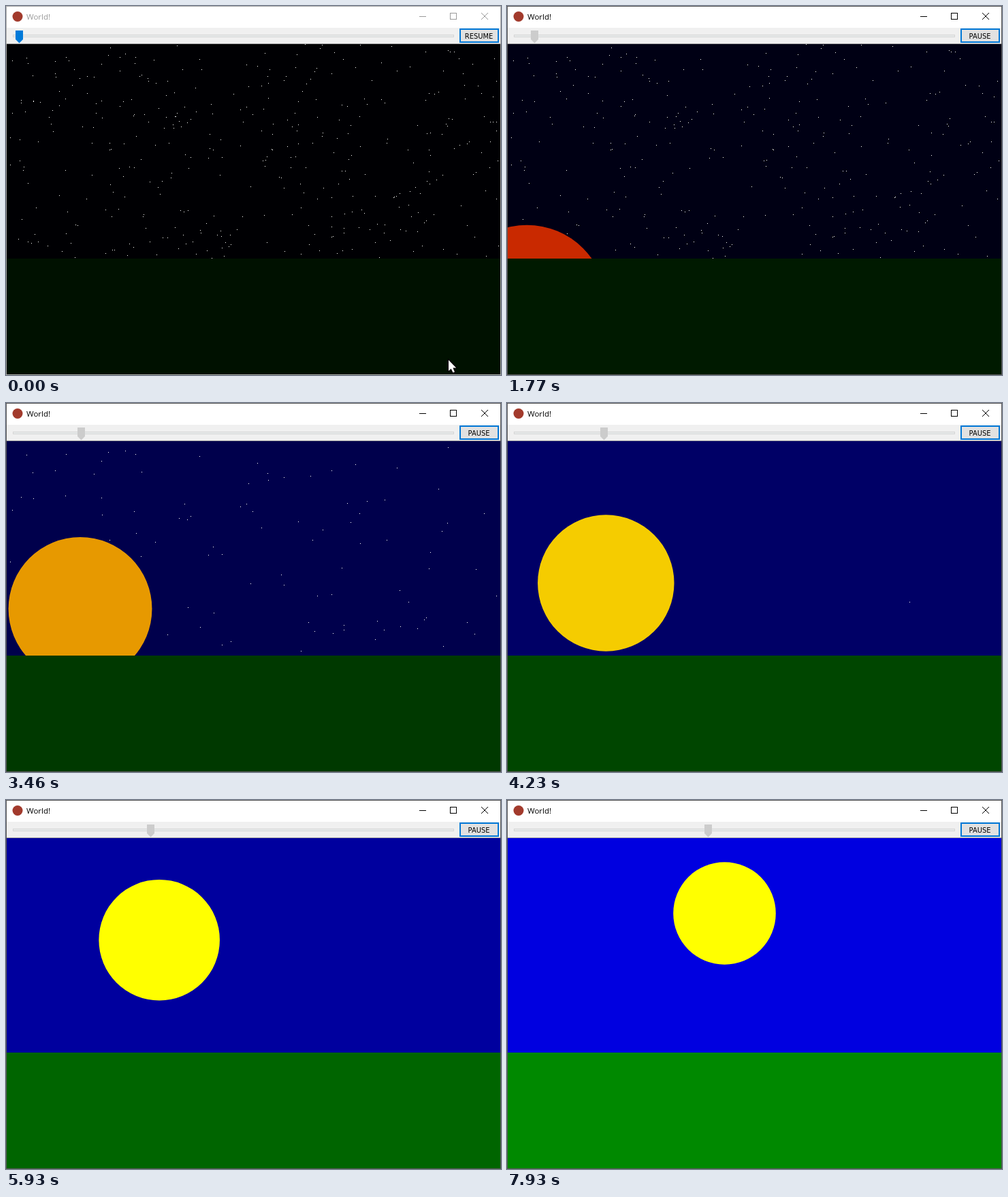
These frames come from a looping animation (727x542 px, 8000 ms). An HTML page with a canvas:

```html
<!DOCTYPE html>
<html lang="en">
<head>
<meta charset="utf-8">
<title>World!</title>
<style>
  html, body { margin: 0; width: 727px; height: 542px; overflow: hidden; background: #000; }
  canvas { display: block; }
</style>
</head>
<body>
<canvas id="stage" width="727" height="542"></canvas>
<script>
const ctx = document.getElementById('stage').getContext('2d');
const W = 727, H = 542, LOOP = 8000;
const SKY_TOP = 56, HORIZON = 371;
const CLICK = 1160, START = 1300, TICK = 76.98;
const TITLE_FONT = '11.5px "Open Sans", "Noto Sans", sans-serif';
const BUTTON_FONT = '9.9px "DejaVu Sans", sans-serif';

const STARS = 400;
const stars = makeStars();

function makeStars() {
  let seed = 20117;
  const rand = n => {
    seed = (seed * 16807) % 2147483647;
    return Math.floor(n * seed / 2147483647);
  };
  return Array.from({ length: STARS }, () => ({
    x: 1 + rand(W - 2),
    y: SKY_TOP + rand(HORIZON - SKY_TOP)
  }));
}

const clamp = (v, lo, hi) => Math.max(lo, Math.min(hi, v));

function rgb(...parts) {
  return `rgb(${parts.map(v => Math.round(clamp(v, 0, 255))).join()})`;
}

function rect(x, y, w, h, color) {
  ctx.fillStyle = color;
  ctx.fillRect(x, y, w, h);
}

function path(points) {
  ctx.beginPath();
  points.forEach(([x, y]) => ctx.lineTo(x, y));
  ctx.closePath();
}

function disc(x, y, r, color) {
  ctx.beginPath();
  ctx.arc(x, y, r, 0, Math.PI * 2);
  ctx.fillStyle = color;
  ctx.fill();
}

function text(str, x, y, font, color, align) {
  ctx.font = font;
  ctx.textAlign = align;
  ctx.fillStyle = color;
  ctx.fillText(str, x, y);
}

function drawTitleBar(active) {
  const ink = active ? '#000' : '#999';
  rect(1, 1, W - 2, 31, '#fff');
  disc(17, 15.5, 7.5, '#a23a2c');
  text('World!', 30, 20, TITLE_FONT, ink, 'left');
  rect(607, 15, 10, 1, ink);
  ctx.strokeStyle = ink;
  ctx.lineWidth = 1;
  ctx.strokeRect(652.5, 10.5, 9, 9);
  ctx.beginPath();
  ctx.moveTo(698, 10);
  ctx.lineTo(708, 20);
  ctx.moveTo(708, 10);
  ctx.lineTo(698, 20);
  ctx.stroke();
}

function drawSlider(x, color) {
  rect(1, 32, W - 2, 23, '#f0f0f0');
  rect(1, 55, W - 2, 1, '#a0a0a0');
  rect(10, 42, 648, 4, '#d6d6d6');
  rect(11, 43, 646, 2, '#e7eaea');
  path([[x - 5, 36], [x + 6, 36], [x + 6, 49], [x + 0.5, 54.5], [x - 5, 49]]);
  ctx.fillStyle = color;
  ctx.fill();
}

function drawButton(label, state) {
  const [edge, face] = {
    normal: ['#0078d7', '#e1e1e1'],
    hover: ['#0078d7', '#e5f1fb'],
    pressed: ['#005499', '#cce4f7']
  }[state];
  rect(666, 33, 58, 21, edge);
  rect(668, 35, 54, 17, face);
  text(label, 694.5, 48, BUTTON_FONT, '#000', 'center');
}

function drawCursor(x, y) {
  ctx.save();
  ctx.translate(x, y);
  path([[0, 0], [0, 16], [3.7, 12.7], [6.5, 18.5], [9, 17.5], [6.4, 11.6], [11.2, 11.4]]);
  ctx.strokeStyle = '#000';
  ctx.lineWidth = 2;
  ctx.stroke();
  ctx.fillStyle = '#fff';
  ctx.fill();
  ctx.restore();
}

function drawSun(x, day) {
  // The upper edge follows an elliptical arc while the disc shrinks
  const d = (363.5 - x) / 360;
  const r = 105.5 - 0.1432 * (x - 108.5);
  const top = 459.2 - 370.8 * Math.sqrt(1 - d * d);
  ctx.save();
  ctx.beginPath();
  ctx.rect(1, SKY_TOP, W - 2, HORIZON - SKY_TOP);
  ctx.clip();
  disc(x, top + r, r, rgb(190 + 275 * day, 1020 * day, 0));
  ctx.restore();
}

function drawWorld(sunX) {
  const day = sunX / W;
  rect(1, SKY_TOP, W - 2, HORIZON - SKY_TOP, rgb(0, 0, 510 * day));
  // Stars go out one by one until a fifth of the day has passed
  const gone = Math.floor(STARS * day / 0.2);
  stars.slice(gone).forEach(s => rect(s.x, s.y, 1, 1, '#fff'));
  drawSun(sunX, day);
  rect(1, HORIZON, W - 2, H - 1 - HORIZON, rgb(0, 15 + 277 * day, 0));
}

function draw(t) {
  const active = t >= CLICK;
  const running = t >= START;
  const step = Math.floor((t - START) / TICK);
  const knob = running ? Math.floor(21.1 + 3.185 * step) : 19;
  const sunX = running ? 7.4 + 3.629 * step : 4.6;

  rect(0, 0, W, H, active ? '#555' : '#aaa');
  drawTitleBar(active);
  drawSlider(knob, active ? '#ccc' : '#007ad9');
  drawWorld(sunX);

  // Pointer travels to the button, then clicks
  const u = clamp((Math.floor((t - 70) / 77) + 1) / 11, 0, 1);
  const ease = u * u * (3 - 2 * u);
  const px = 650 + 43 * ease, py = 520 - 477 * ease;
  let state = 'normal';
  if (!running && active) state = 'pressed';
  else if (!running && py < 54) state = 'hover';
  drawButton(active ? 'PAUSE' : 'RESUME', state);
  if (!running) drawCursor(px, py);
}

function frame() {
  draw(performance.now() % LOOP);
  requestAnimationFrame(frame);
}
frame();
</script>
</body>
</html>
```
